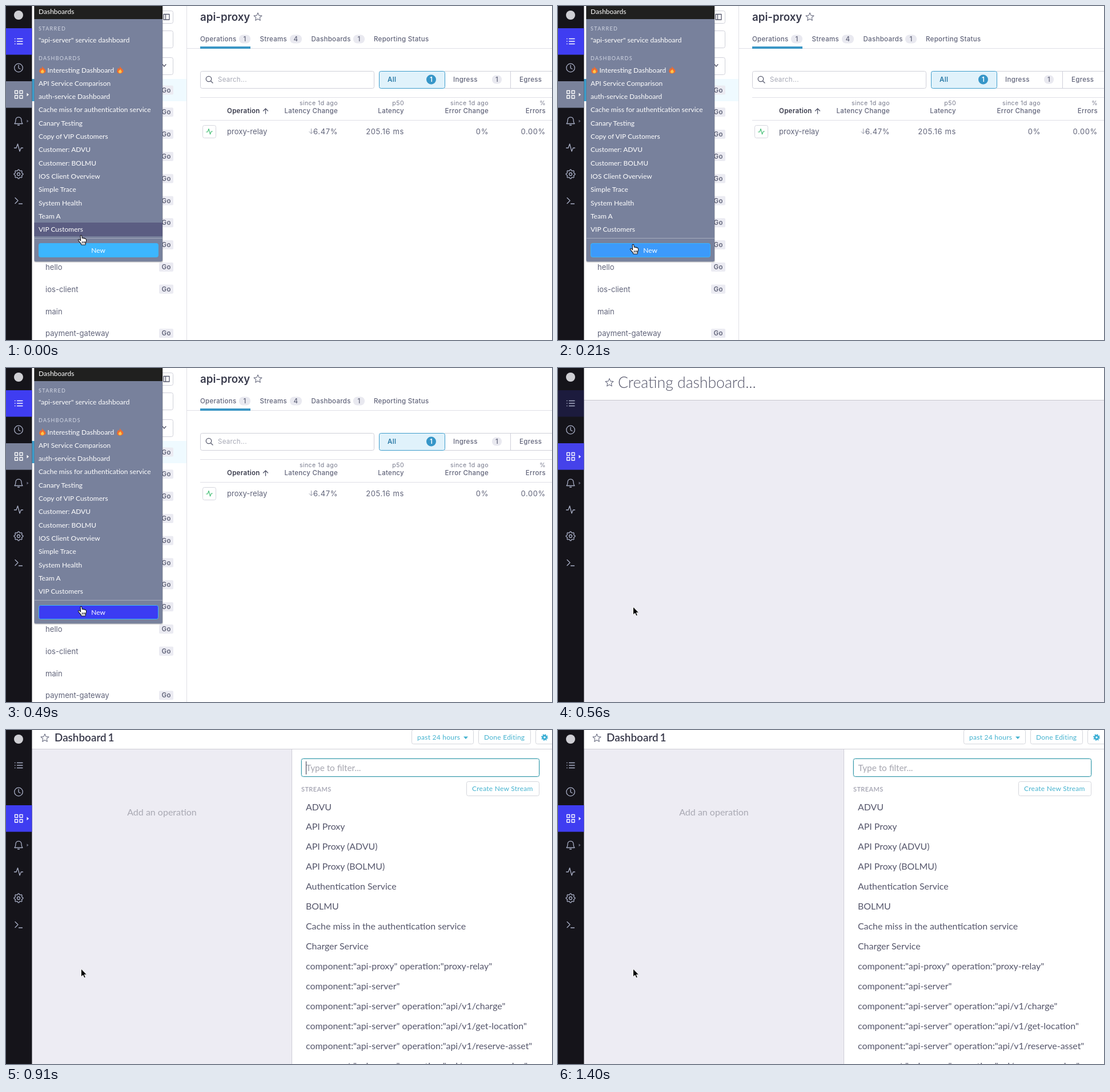
Write an HTML page that moves like this. It is 956x586 px and loops after 1610 ms.

```html
<!DOCTYPE html>
<html lang="en">
<head>
<meta charset="utf-8">
<title>New dashboard</title>
<style>
html, body { margin: 0; width: 100%; height: 100%; overflow: hidden; background: #fff; }
svg { display: block; width: 100%; height: 100%; }
text { font-family: Lato, sans-serif; white-space: pre; }
.ui text { font: 11.5px Inter, sans-serif; letter-spacing: .3px; fill: #61647a; }
.ui .row { font-size: 13.1px; letter-spacing: 0; }
.ui .num { font-size: 13px; letter-spacing: .6px; }
.ui .note { font-size: 10.5px; letter-spacing: .45px; fill: #777a8c; }
.ui .mid { font-weight: 500; }
.ui .bold { font-weight: 600; }
.end { text-anchor: end; }
.center { text-anchor: middle; }
.menu text { font-size: 12px; fill: #fff; }
.menu .head { font-size: 9px; letter-spacing: 1.3px; fill: #d3d8e5; }
.line { fill: none; stroke: #dfdfe6; }
.icon { fill: none; stroke: #a9afc6; stroke-width: 1.3; stroke-linecap: round; stroke-linejoin: round; }
.list text { font-size: 15.9px; fill: #55566b; }
.button rect { fill: #fff; stroke: #d4d6dc; }
.button text { font-size: 12px; letter-spacing: .25px; fill: #43b2cf; }
</style>
</head>
<body>
<svg viewBox="0 0 956 586">
  <defs>
    <path id="star" d="M0-7 2-2.4 7-1.9 3.3 1.4 4.3 6.3 0 3.8-4.3 6.3-3.3 1.4-7-1.9-2-2.4Z" fill="none" stroke="#6c6f83" stroke-width="1.1" stroke-linejoin="round"/>
    <g id="flame">
      <path d="M-1-7C0-3 5-2 5.5 2 6 6-3 9-5.3 4-6.5 1-4-1-3.8-3.5-2.5-3-2-2-2-1-1-2.5-.5-5-1-7Z" fill="#ef6c2f"/>
      <path d="M.5-1C1 1 3 2 2.6 4 2 6.5-3 6.5-3 3.5-3 2-2 1.5-1.8.5-1 1 0 0 .5-1Z" fill="#ffc64a"/>
    </g>
  </defs>

  <g id="services" class="ui">
    <rect x="45" y="128" width="271" height="39" fill="#effaff"/>
    <rect x="45" y="128" width="5" height="39" fill="#3c9dcb"/>
    <g class="line">
      <path d="M316.5 0V586M317 74.5H956M340 160.5H956M340 200.5H956"/>
      <rect x="250.5" y="8.5" width="42" height="22" rx="3" stroke="#cfd0d9"/>
      <rect x="69.5" y="43.5" width="223" height="30" rx="3" stroke="#cfd0d9"/>
      <rect x="69.5" y="90.5" width="223" height="30" rx="3" stroke="#cfd0d9"/>
      <rect x="340.5" y="114.5" width="304" height="30" rx="3" stroke="#cfd0d9"/>
      <path d="M768 114.5H960M768 144.5H960M883.5 114V145" stroke="#cfd0d9"/>
      <rect x="344.5" y="209.5" width="23" height="22" rx="3" stroke="#d5d6de"/>
    </g>
    <rect x="653.5" y="114.5" width="115" height="30" rx="3" fill="#e0f2fb" stroke="#3d9ccb"/>
    <rect x="340" y="71" width="88" height="4" fill="#3a96c5"/>
    <g class="icon" style="stroke:#55586c">
      <path d="M276 14.5H286V24H276ZM279.5 14.5V24M274 102.5 277 106 280 102.5"/>
      <circle cx="355" cy="128" r="4.7"/><path d="M358.5 131.5 362 135"/>
      <path d="M454.5 189V180M450.5 184 454.5 180 458.5 184"/>
      <path d="M534.5 215.5V224M531 220.5 534.5 224 538 220.5" stroke="#9a9cab" stroke-width="1"/>
      <path d="M350.5 221H353L355 215.5 357.5 225 359.5 220H361.5" stroke="#48c078" stroke-width="1.2"/>
    </g>
    <text x="340" y="26" class="bold" style="font-size:18.7px;letter-spacing:0;fill:#393b4c">api-proxy</text>
    <use href="#star" x="441" y="19"/>
    <g id="labels"></g>
    <g id="rows"></g>
  </g>

  <g id="menu" class="menu">
    <rect x="49" y="-5" width="226" height="455" rx="3" fill="#000" opacity=".18"/>
    <rect x="49.5" y="-5" width="224.5" height="453.5" rx="3" fill="#78819c"/>
    <rect x="49.5" y="0" width="224.5" height="23" fill="#20201f"/>
    <rect id="hover" x="49.5" y="380" width="224.5" height="24" fill="#5b5d82"/>
    <path d="M49.5 407.5H274" stroke="#a5abbd"/>
    <rect id="new" x="57.5" y="416.5" width="209" height="24" rx="3" stroke="#3cb4fb"/>
    <text x="161.5" y="433" class="center">New</text>
    <text x="57" y="14">Dashboards</text>
    <text x="57" y="43" class="head">STARRED</text>
    <text x="57" y="64">"api-server" service dashboard</text>
    <text x="57" y="95" class="head">DASHBOARDS</text>
    <use href="#flame" x="64" y="112"/><use href="#flame" x="200" y="112"/>
    <g id="choices"></g>
  </g>

  <g id="creating">
    <rect x="45" width="911" height="586" fill="#fff"/>
    <rect x="45" y="57" width="911" height="529" fill="#edecf3"/>
    <path d="M45 56.5H956" stroke="#c8c7ce"/>
    <use id="spinner" href="#star"/>
    <text x="105" y="35" font-size="26.6" font-weight="300" fill="#55566a">Creating dashboard...</text>
  </g>

  <g id="editor">
    <rect x="45" width="911" height="586" fill="#fff"/>
    <rect x="45" y="34" width="455" height="552" fill="#edecf3"/>
    <path d="M45 33.5H956M500.5 34V586" stroke="#cfced6"/>
    <use href="#star" x="68" y="14"/>
    <text x="85" y="20" font-size="18.9" font-weight="600" word-spacing="-2" fill="#38394a">Dashboard 1</text>
    <text x="273" y="150" font-size="16" fill="#a9a9b3" class="center">Add an operation</text>
    <g class="button">
      <rect x="710.5" y="-.5" width="108" height="25" rx="3"/><text x="720" y="17">past 24 hours</text>
      <path d="M801 11.5H809L805 16Z" fill="#43b2cf"/>
      <rect x="827.5" y="-.5" width="91" height="25" rx="3"/><text x="837" y="17">Done Editing</text>
      <rect x="927.5" y="-.5" width="40" height="25" rx="3"/>
      <circle cx="943" cy="13" r="3.1" fill="none" stroke="#35acd3" stroke-width="2.6"/>
      <circle cx="943" cy="13" r="5" fill="none" stroke="#35acd3" stroke-width="1.8" stroke-dasharray="1.96"/>
      <rect x="806.5" y="90.5" width="127" height="25" rx="3"/><text x="816" y="107">Create New Stream</text>
    </g>
    <rect x="516.5" y="49.5" width="418" height="33" rx="4" fill="#fff" stroke="#c3e4ea"/>
    <rect x="517.5" y="50.5" width="416" height="31" rx="3" fill="#fff" stroke="#459fae"/>
    <text x="525.5" y="72" font-size="15.3" fill="#a6a6b0">Type to filter...</text>
    <rect id="caret" x="525" y="55" width="1" height="23" fill="#34354a"/>
    <text x="517" y="108" font-size="11" font-weight="600" letter-spacing=".4" fill="#a1a1af">STREAMS</text>
    <g id="streams" class="list"></g>
  </g>

  <g id="sidebar">
    <rect width="45.5" height="586" fill="#15141a"/>
    <rect id="tab1" y="39" width="45.5" height="46.5" fill="#3f3df1"/>
    <rect id="tab3" y="132" width="45.5" height="46.6"/>
    <circle cx="22" cy="16" r="8" fill="#cfcfd4"/>
    <g class="icon">
      <path id="listIcon" d="M19.5 57.5H29M19.5 62H29M19.5 66.5H29M15.5 57.5H16M15.5 62H16M15.5 66.5H16"/>
      <circle cx="22" cy="108.5" r="7.3"/><path d="M22 104V109L25 110.5"/>
      <path d="M15.5 148.5H20.5V153.5H15.5ZM24 148.5H29V153.5H24ZM15.5 157H20.5V162H15.5ZM24 157H29V162H24Z" stroke="#fff"/>
      <path d="M15 206.5C17 204.5 17 203 17 200 17 193.5 27 193.5 27 200 27 203 27 204.5 29 206.5ZM20.5 209H23.5"/>
      <path d="M14.5 249H18L20.5 242 24 255 26.5 249H29.5"/>
      <path id="gear"/><circle cx="22" cy="295" r="2.5"/>
      <path d="M16 336.5 21 341.5 16 346.5M22.5 347H28.5"/>
    </g>
    <path d="M36.5 152.5 40 155.5 36.5 158.5Z" fill="#fff"/>
    <path d="M36.5 199.5 39.5 202 36.5 204.5Z" fill="#696c7e"/>
  </g>

  <path id="hand" d="M-3.8-7.5C-3.8-9-1.4-9-1.2-7.5L-.6-3.5C0-4.5 1.5-4.3 1.8-3.2 2.5-4 4-3.7 4.2-2.5 5-3 6.4-2.6 6.5-1.3 6.8 1 6.5 3 5.5 5L5 8H-2L-3 5.5C-5 3.5-6.5 2-7.5-.2-7.5-1.6-6-1.9-4.8-.8L-3.3.8ZM-.5 2V5.5M2 2V5.5M4.2 2V5.5" fill="#fff" stroke="#15151c" stroke-width="1.1" stroke-linejoin="round"/>
  <path id="arrow" d="M131.5 419V433L134.8 430 137 435 139.3 434 137.2 429.2H141.5Z" fill="#000" stroke="#fff" stroke-width=".9"/>
</svg>
<script>
const $ = id => document.getElementById(id);
const text = (x, y, s, cls = '') => `<text x="${x}" y="${y}" class="${cls}">${s}</text>`;
const column = (x, y, step, items) => items.map((s, i) => text(x, y + i * step, s)).join('');
const pill = (x, y, w, s) =>
  `<rect x="${x}" y="${y - 7.5}" width="${w}" height="15" rx="7" fill="#e9e9f0"/>` + text(x + w / 2, y + 4, s, 'center mid');

$('choices').innerHTML = text(72.5, 116.5, 'Interesting Dashboard') + column(57, 139.8, 23.3, [
  'API Service Comparison', 'auth-service Dashboard', 'Cache miss for authentication service',
  'Canary Testing', 'Copy of VIP Customers', 'Customer: ADVU', 'Customer: BOLMU',
  'IOS Client Overview', 'Simple Trace', 'System Health', 'Team A', 'VIP Customers']);

const server = 'component:"api-server"';
$('streams').innerHTML = column(525, 140.5, 34.95, [
  'ADVU', 'API Proxy', 'API Proxy (ADVU)', 'API Proxy (BOLMU)', 'Authentication Service', 'BOLMU',
  'Cache miss in the authentication service', 'Charger Service',
  'component:"api-proxy" operation:"proxy-relay"', server,
  ...['v1/charge', 'v1/get-location', 'v1/reserve-asset', 'process-session'].map(s => `${server} operation:"api/${s}"`)]);

const names = { 8: 'hello', 9: 'ios-client', 10: 'main', 11: 'payment-gateway' };
$('rows').innerHTML = Array.from({ length: 12 }, (_, i) => {
  const y = 147.5 + i * 38.8;
  const badge = `<rect x="268" y="${y - 8}" width="25" height="16" rx="2" fill="#ebebf2"/>` + text(280.7, y + 4, 'Go', 'center bold');
  return text(69, y + 5, names[i] || '', 'row') + (i === 10 ? '' : badge);
}).join('');

const headings = [[581, 'since 1d ago', 'Latency Change', '6.47%'], [697, 'p50', 'Latency', '205.16 ms'],
  [845, 'since 1d ago', 'Error Change', '0%'], [945, '%', 'Errors', '0.00%']];
$('labels').innerHTML =
  [[340, 'Operations'], [444.5, 'Streams'], [534.5, 'Dashboards'], [644, 'Reporting Status']]
    .map(([x, s]) => text(x, 62, s, 'mid')).join('') +
  pill(408, 58, 20, '1') + pill(497, 58, 21, '4') + pill(608, 58, 20, '1') + pill(851, 129, 17, '1') +
  '<circle cx="744.5" cy="129" r="8.5" fill="#3696c8"/>' +
  '<text x="744.5" y="133" class="center bold" style="fill:#fff">1</text>' +
  '<text x="371" y="133" style="fill:#a6a8b5">Search...</text>' +
  '<text x="668" y="133" class="bold" style="fill:#2b7ba7">All</text>' +
  text(783, 133, 'Ingress', 'mid') + text(899, 133, 'Egress', 'mid') +
  '<text x="387" y="188" class="bold" style="fill:#393b4c">Operation</text>' + text(387, 225, 'proxy-relay', 'row') +
  headings.map(([x, note, head, value]) =>
    text(x, 174, note, 'note end') + text(x, 188, head, 'end mid') + text(x, 225, value, 'num end')).join('');

$('gear').setAttribute('d', 'M' + Array.from({ length: 64 }, (_, i) => {
  const a = i * Math.PI / 32, r = 7 + Math.max(-.8, Math.min(.9, 1.6 * Math.cos(8 * a)));
  return `${(22 + r * Math.sin(a)).toFixed(2)} ${(295 - r * Math.cos(a)).toFixed(2)}`;
}).join('L') + 'Z');

const LOOP = 1610, STEP = 70, CREATE = 560, EDIT = 910;
const clamp = v => Math.max(0, Math.min(1, v));
const mix = (a, b, k) => `rgb(${a.map((v, i) => Math.round(v + (b[i] - v) * k))})`;
const show = (id, on) => { $(id).style.display = on ? '' : 'none'; };

function draw(now) {
  const t = Math.floor(now % LOOP / STEP) * STEP;
  const choosing = t < CREATE, editing = t >= EDIT;
  show('services', choosing);
  show('menu', choosing);
  show('creating', !choosing && !editing);
  show('editor', editing);
  show('hand', choosing);
  show('arrow', !choosing);
  show('hover', t < STEP);
  show('caret', t < 1400);

  $('hand').setAttribute('transform', `translate(134 ${411 + 16 * clamp(t / 140)})`);
  $('new').setAttribute('fill', mix([60, 182, 254], [59, 60, 243], clamp((t - 140) / 300)));
  $('spinner').setAttribute('transform', `translate(90 25.5) rotate(${(t - CREATE) * .36})`);
  $('tab1').setAttribute('opacity', choosing ? 1 : .16 * clamp(1 - (t - CREATE) / 140));
  $('tab3').setAttribute('fill', choosing ? '#7a829b' : mix([69, 66, 234], [63, 61, 241], clamp((t - CREATE) / 140)));
  $('listIcon').style.stroke = choosing ? '#fff' : '';
}

const start = performance.now();
function tick() {
  draw(performance.now() - start);
  requestAnimationFrame(tick);
}
tick();
</script>
</body>
</html>
```
